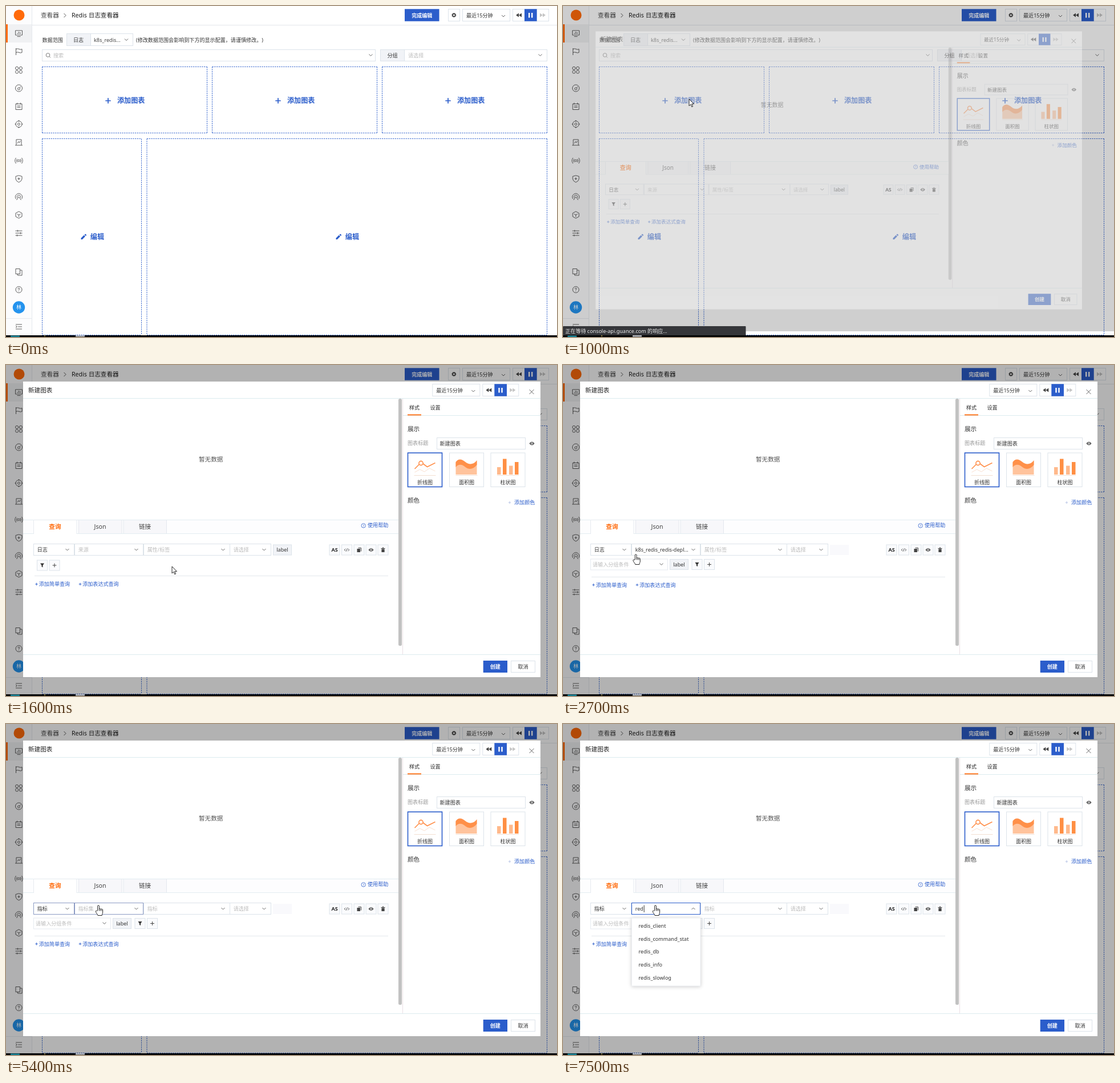
Write an HTML page that moves like this. It is 966x580 px and loops after 8000 ms.

```html
<!DOCTYPE html>
<html lang="zh-CN">
<head>
<meta charset="utf-8">
<title>Redis 日志查看器</title>
<style>
html, body { margin: 0; width: 100%; height: 100%; overflow: hidden; background: #fff; }
svg { display: block; width: 100vw; height: 100vh; }
text { font-family: "Noto Sans", "Noto Sans CJK SC", sans-serif; white-space: pre; text-spacing-trim: space-all; }
</style>
</head>
<body>
<svg viewBox="0 0 966 580">
  <g id="page"></g>
  <rect id="mask" width="966" height="577"/>
  <g id="modal"><g id="panel"></g><g id="query"></g></g>
  <g id="status"></g>
  <g id="bar"></g>
  <path id="cursor" fill="#fff" stroke="#111" stroke-width=".9" stroke-linejoin="round"/>
</svg>
<script>
const BLUE = '#2b5dcb', ORANGE = '#ff6a0a', INK = '#333', DIM = '#bcbcbc', EDGE = '#dce3ea', PALE = '#f1f3f7';
const S = 9.07, M = 10.6, L = 12.1;
const $ = id => document.getElementById(id);

// Drawing helpers: text is placed by its left edge and vertical centre.
const text = (x, y, s, fill = INK, size = S, more = '') =>
  `<text x="${x}" y="${(y + size * .37).toFixed(2)}" font-size="${size}" fill="${fill}" ${more}>${s}</text>`;
const mid = (x, y, s, fill, size, more = '') => text(x, y, s, fill, size, 'text-anchor="middle" ' + more);
const rect = (x, y, x2, y2, fill = '#fff', stroke = 'none', more = '') =>
  `<rect x="${x}" y="${y}" width="${x2 - x}" height="${y2 - y}" fill="${fill}" stroke="${stroke}" ${more}/>`;
const path = (d, stroke = '#555', w = 1, more = '') =>
  `<path d="${d}" stroke="${stroke}" stroke-width="${w}" fill="none" ${more}/>`;
const solid = (d, fill) => `<path d="${d}" fill="${fill}"/>`;
const disc = (x, y, r, fill = 'none', stroke = 'none', w = 1) =>
  `<circle cx="${x}" cy="${y}" r="${r}" fill="${fill}" stroke="${stroke}" stroke-width="${w}"/>`;
const at = (x, y, s) => `<g transform="translate(${x} ${y})">${s}</g>`;
const chevron = (x, y, up) => path(`M${x - 3} ${y + (up ? 1.5 : -1.5)}l3 ${up ? -3 : 3}l3 ${up ? 3 : -3}`, '#666');
const plus = (x, y, r, c, w) => path(`M${x - r} ${y}h${2 * r}M${x} ${y - r}v${2 * r}`, c, w);
const BOLD = 'font-weight="700"', MEDIUM = 'font-weight="500"';

const eye = (x, y) => at(x, y, solid('M-4.5 0Q0-6 4.5 0Q0 6-4.5 0', '#444') + disc(0, 0, 1.9, '#fff') + disc(0, 0, 1, '#444'));

// Time range select with the rewind / pause / forward group.
const player = () =>
  rect(800.5, 5.5, 883.5, 26.5, '#fff', EDGE) + text(807, 16.5, '最近15分钟') + chevron(872, 17.5) +
  rect(888.5, 5.5, 951.5, 26.5, '#fff', EDGE) + rect(909, 5.3, 930.7, 26.7, BLUE) +
  solid('M899 12.5v7l-5-3.5zM904 12.5v7l-5-3.5z', '#444') +
  rect(916, 12, 918.4, 20.5) + rect(921, 12, 923.4, 20.5) +
  solid('M936 12.5v7l5-3.5zM941 12.5v7l5-3.5z', '#c4c4c4');

const pencil = (x, y) => at(x, y, solid('M-4.5 4.5v-2.3l5.2-5.2l2.3 2.3l-5.2 5.2zM1.5-3.8l1-1q.6-.5 1.2 0l1.1 1.1q.5.6 0 1.2l-1 1z', BLUE));

// Every side starts its own dash pattern, as a CSS border does.
const dashed = (x, y, x2, y2) =>
  path(`M${x} ${y}H${x2}M${x} ${y2}H${x2}M${x} ${y}V${y2}M${x2} ${y}V${y2}`, BLUE, .95, 'stroke-dasharray="2.27 1.51"');

const sideIcons = [
  [48, 'M-6-5h12v8h-12zM-3 5.5h6M-2.5 1v-2M0 1v-4M2.5 1v-3'],
  [80, 'M-5-6v12M-5-4.5q3-1.5 5.5 0t5 0v6q-2.5 1.2-5 0t-5.5 0'],
  [112, 'M-6-3a2.6 2.6 0 1 1 5.2 0a2.6 2.6 0 1 1-5.2 0M.8-3a2.6 2.6 0 1 1 5.2 0a2.6 2.6 0 1 1-5.2 0M-6 3.5a2.6 2.6 0 1 1 5.2 0a2.6 2.6 0 1 1-5.2 0M.8 3.5a2.6 2.6 0 1 1 5.2 0a2.6 2.6 0 1 1-5.2 0'],
  [144, 'M-6 0a6 6 0 1 1 12 0a6 6 0 1 1-12 0M-2 1a2 2 0 1 1 4 0a2 2 0 1 1-4 0M1.2-.5L3.5-3'],
  [176, 'M-5.5-4.5h11v10h-11zM-3-6.5v3M3-6.5v3M-3-1h6M-3 1.5h6'],
  [207, 'M-5.5 0a5.5 5.5 0 1 1 11 0a5.5 5.5 0 1 1-11 0M-2 0a2 2 0 1 1 4 0a2 2 0 1 1-4 0M0-7v2.5M0 7v-2.5M-7 0h2.5M7 0h-2.5'],
  [239, 'M-4.5 5v-10h9v10M-6.5 5h13M-2.5 1.5l2-3l1.5 2l1.8-3'],
  [271, 'M-1.8 0a1.8 1.8 0 1 1 3.6 0a1.8 1.8 0 1 1-3.6 0M-3-3q-2 3 0 6M3-3q2 3 0 6M-5-5q-3.5 5 0 10M5-5q3.5 5 0 10'],
  [303, 'M0-6l5.5 1.5v4.5q-.5 4-5.5 6q-5-2-5.5-6v-4.5zM-2.2-.3h4.4M0-2.5v4.4'],
  [334, 'M-5 4a6 6 0 1 1 10 0M-3 2a3.3 3.3 0 1 1 6 0M0 0l-4 6M0 0l4 6'],
  [366, 'M0-6l5.5 3v6l-5.5 3l-5.5-3v-6zM-3-1.5l3 1.5l3-1.5M0 0v3.5'],
  [398, 'M-6-4h12M-6 0h12M-6 4h12M-2-5.5v3M3-1.5v3M-3 2.5v3'],
  [466, 'M-5.5-5.5h7.5v9h-7.5zM2-3h3.5v9h-7.5v-2.5'],
  [497, 'M-5.5 0a5.5 5.5 0 1 1 11 0a5.5 5.5 0 1 1-11 0M-1.5-1q0-2 1.5-2t1.5 1.5q0 1-1.5 1.5v1M0 2.5v1'],
  [562, 'M-5.5-4h11M-1.5 0h7M-5.5 4h11M-5.5-1.8l2.5 1.8l-2.5 1.8']
];

const sidebar = () =>
  rect(0, 0, 45, 577, '#fcfcfd') + path('M45.5 0V577', '#e6e9ee') + rect(0, 32, 45, 64, '#f0f1f3') + rect(0, 32, 3, 64, ORANGE) +
  disc(23, 16, 9.5, ORANGE) + sideIcons.map(([y, d]) => at(22.5, y, path(d, '#555', .95))).join('') +
  disc(22.5, 528, 10.7, '#2493ee') + mid(22.5, 528, '林', '#fff', S) + path('M0 547.5H45', '#e6e9ee');

const page = () =>
  rect(0, 0, 966, 580) + sidebar() + path('M45 33.5H966', '#e3e6ea') +
  text(61, 16.5, '查看器', '#444', M) + path('M101.5 13l3.5 3.5l-3.5 3.5', '#555') + text(115, 16.5, 'Redis 日志查看器', '#1c1c1c', M) +
  rect(699, 5.3, 759.5, 26.7, BLUE) + mid(729.3, 16.5, '完成编辑', '#fff', S, BOLD) +
  rect(775.5, 5.5, 795.5, 26.5, '#fff', EDGE) + disc(785.3, 16, 2.4, 'none', '#444', 1.7) +
  `<circle cx="785.3" cy="16" r="3.5" fill="none" stroke="#444" stroke-dasharray="1.5 1.25"/>` + player() +
  text(63.5, 59.5, '数据范围') + rect(106.5, 48.5, 222.5, 69.5, '#fff', EDGE) + rect(107, 49, 148, 69, PALE) + path('M148.5 49V69', EDGE) +
  text(118, 59.5, '日志') + text(154, 59.5, 'k8s_redis...', '#444') + chevron(211, 59) +
  text(228, 59.5, '(修改数据范围会影响到下方的显示配置，请谨慎修改。)') +
  rect(63.5, 76.5, 647.5, 96.5, '#fff', EDGE) + disc(73.5, 86, 3.3, 'none', '#777') + path('M76 88.5l2 2', '#777') +
  text(83, 86.5, '搜索', DIM) + chevron(639.5, 86) +
  rect(656.5, 76.5, 948.5, 96.5, '#fff', EDGE) + rect(657, 77, 698, 96, PALE) + path('M698.5 77V96', EDGE) +
  text(668.5, 86.5, '分组') + text(705, 86.5, '请选择', DIM) + chevron(936.5, 86) +
  [64, 362, 660].map(x => dashed(x - .5, 106.5, x + 288.5, 222.5) + plus(x + 115, 166, 4.7, BLUE, 1.7) +
    text(x + 131, 165.2, '添加图表', BLUE, L, BOLD)).join('') +
  [[63.5, 237.5, 136], [247, 948.5, 583]].map(([a, b, x]) => dashed(a, 232.5, b, 576.5) + pencil(x, 404.5) +
    text(x + 11.8, 405, '编辑', BLUE, L, BOLD)).join('');

const card = (x, name, art, on) =>
  rect(x, 154, x + 60, 213.5, '#fff', on ? BLUE : EDGE, on ? 'stroke-width="1.6"' : '') + at(x, 0, art) +
  path(`M${x + 11} 193.5h38`, '#f3dfd2') + mid(x + 30, 205.5, name);

const iconBox = (x, y, art) => rect(x - 9, y - 9, x + 9, y + 9, '#fafbfd', EDGE) + at(x, y, art);
const filterBox = (x, y) => iconBox(x, y, solid('M-3.5-3.5h7l-2.5 3.5v3.5l-2-1v-2.5z', '#333'));
const plusBox = (x, y) => iconBox(x, y, plus(0, 0, 3.4, '#444', 1));
const labelBox = (x, y) => rect(x + .5, y - 9, x + 32.5, y + 9, PALE, EDGE) + mid(x + 16.5, y, 'label');

const panel = () =>
  rect(30, 29, 937, 547) + text(39, 44, '新建图表', '#222', M, MEDIUM) + path('M30 58.5H937M30 507.5H937', '#dcebef') +
  at(-52.7, 28, player()) + path('M917.5 43l8 8M925.5 43l-8 8', '#666') +
  path('M695.5 59V507', '#eadfe4') + rect(688, 59, 694, 492, '#c2c2c2', 'none', 'rx="2.5"') +
  text(707, 74.5, '样式', '#222', S, MEDIUM) + text(743.5, 74.5, '设置') + path('M696 88.5H937', '#dcebef') + rect(704, 86.5, 728, 88.3, ORANGE) +
  text(704, 112, '展示', INK, M) + text(704, 137, '图表标题', '#999') + rect(755.5, 127.5, 910.5, 147.5, '#fff', EDGE) + text(760.5, 137.5, '新建图表') + eye(922, 137.5) +
  card(704.5, '折线图', path('M12 182l8-8M26 172.5l8 6l14-7', '#ff8f4a', 1.6) + disc(23, 172, 3.6, '#fff', '#ff8f4a', 1.6) +
    path('M12 188l9-5l8 4l9-6l10 5', '#fae0d0'), true) +
  card(777.5, '面积图', solid('M11 171c5-7 11-5 17 0s14 5 20-3v24h-37z', '#ffc39c') + solid('M11 170c5-7 11-5 17 0s14 5 20-3v8c-6 8-14 9-20 4s-12-6-17 0z', '#ff9049')) +
  card(850, '柱状图', [[11, 179], [21, 164.5], [32, 176.5], [42, 170]].map(([x, y], i) => rect(x, y, x + 6.5, 192, i % 2 ? '#ff8f43' : '#ffb98c')).join('')) +
  text(704, 237.5, '颜色', INK, M) + plus(883, 241, 2.2, '#b9c6e6', 1) + text(891, 241, '添加颜色', BLUE) +
  text(338, 165.5, '暂无数据', '#555', M) +
  rect(30, 271, 688, 295, '#fdfdfe') + path('M30 271.5H688M30 295.5H688', '#e3edf1') +
  rect(127, 272, 203, 295, '#f7f7fa') + rect(206, 272, 281, 295, '#f7f7fa') + path('M127.5 271V295M203 271V295M206 271V295M281.5 271V295', '#e4e7ee') +
  rect(48, 271, 124, 296.5) + path('M48.5 296V271.5H124V296', '#e6ebf0') + text(75.3, 283.5, '查询', ORANGE, M, BOLD) +
  mid(165, 283.5, 'Json', '#444', M) + text(233, 283.5, '链接', '#444', M) +
  disc(626.7, 281.5, 3.7, 'none', BLUE, .8) + mid(626.7, 281.5, '?', BLUE, 6) + text(634, 281, '使用帮助', BLUE) +
  iconBox(576, 324, mid(0, 0, 'AS', '#222', S, BOLD)) +
  iconBox(597.5, 324, path('M-2-2l-2.3 2l2.3 2M2-2l2.3 2l-2.3 2M.8-2.5l-1.6 5', '#444', .9)) +
  iconBox(619, 324, path('M-1.5-3.5h5v6', '#444', 1) + rect(-3.5, -2, 2, 4, '#444')) +
  iconBox(640, 324, eye(0, 0)) +
  iconBox(661, 324, rect(-2.6, -1.5, 2.6, 4, '#444') + path('M-3.5-2.5h7M-1-3.8h2', '#444', 1.2)) +
  rect(836.7, 518, 879, 539, BLUE) + mid(857.8, 528.5, '创建', '#fff', S, BOLD) +
  rect(885.5, 518.5, 927.5, 538.5, '#fff', EDGE) + mid(906.5, 528.5, '取消');

const select = (x, x2, s, fill, edge = EDGE, up = false) =>
  rect(x + .5, 313.5, x2 + .5, 333.5, '#fff', edge) + text(x + 6.7, 324, s, fill) + chevron(x2 - 11.5, 323.5, up);

const list = (x, y, x2, y2, items, tx, first, hover, scroll) =>
  rect(x, y, x2, y2, '#fff', '#eceef1', 'rx="1" style="filter:drop-shadow(0 1px 3px #0003)"') +
  (hover ? rect(x + 1, first - 11, x2 - 1, first + 11, '#f3f5f9') : '') +
  `<svg x="0" y="0" width="966" height="${y2}" style="width:966px;height:${y2}px">` +
  items.map((s, i) => text(tx, first + i * 22.7, s)).join('') + '</svg>' +
  (scroll ? rect(x2 - 6.5, y, x2 - .5, scroll, '#c4c4c4', 'none', 'rx="3"') : '');

const kinds = ['指标', '日志', '系统对象', '自定义对象', '事件', '应用性能', '用户访问'];
const redis = ['client', 'command_stat', 'db', 'info', 'slowlog'].map(s => 'redis_' + s);
const sets = ['cpu', 'disk', 'diskio', 'docker_containers', 'elastic_cluster_health', 'elastic_cluster_stats', 'host_processes'];
const setsR = ['docker_containers', 'elastic_cluster_health', 'host_processes', 'kube_replicaset', ...redis.slice(0, 3)];

function query(t) {
  const filled = t >= 2500, metric = t >= 4900, open1 = t >= 3900 && !metric, open2 = t >= 5600;
  const typed = t >= 7500 ? 'red' : t >= 7300 ? 're' : t >= 7100 ? 'r' : '';
  const caret = open2 && (typed || (t - 5600) % 1000 < 500);
  const soft = '#8c9bc4';
  let s = select(241, 392, metric ? '指标' : '属性/标签', DIM) + select(392, 464, '请选择', DIM);
  s += select(120, 240, typed || (metric ? '指标集' : filled ? 'k8s_redis_redis-depl...' : '来源'),
    typed || (filled && !metric) ? INK : DIM, open2 ? BLUE : t >= 5200 ? soft : EDGE, open2);
  s += select(48, 119, metric ? '指标' : '日志', open1 ? DIM : INK, open1 || (metric && t < 5700) ? soft : EDGE, open1);
  if (filled) {
    s += rect(468, 315, 501, 333, '#f9f9fc') + rect(48.5, 340, 183.5, 359, '#fff', '#e6eaf0') + text(52, 349.5, '请输入分组条件', DIM) + chevron(172.5, 349) +
      labelBox(187, 349.5) + filterBox(235, 349.5) + plusBox(256.5, 349.5);
  } else {
    s += labelBox(468, 324) + filterBox(63.5, 351) + plusBox(85, 351);
  }
  const y = filled ? 385.3 : 384;
  s += path(`M50 ${filled ? 371.5 : 369.5}H670`, '#e4e8ec') +
    [[50.5, '添加简单查询'], [127, '添加表达式查询']].map(([x, w]) => plus(x + 3, y, 2.3, BLUE, .9) + text(x + 7.2, y, w, BLUE)).join('');
  if (t >= 3900 && t < 5200) {
    const fade = metric ? Math.max(0, .6 - (t - 4900) / 300) : 1;
    s += `<g opacity="${fade}">` + list(48.5, 338, 124.5, 490, kinds, 60.5, 353.5, t >= 4300, 446) + '</g>';
  }
  if (open2) {
    const fade = Math.min(1, .5 + (t - 5600) / 400);
    const [x2, y2, items] = typed === 'red' ? [241, 459, redis] : typed === 're' ? [241, 482, ['kube_replicaset', ...redis]] :
      [270, 490, typed ? setsR : sets];
    s += `<g opacity="${fade}">` + list(120.5, 340, x2, y2, items, 132.5, 353.5, false, x2 > 250 && 386) + '</g>';
  }
  if (caret) {
    const x = 127 + 4.9 * typed.length;
    s += rect(x, 317.5, x + .9, 330, '#222');
  }
  return s;
}

const ARROW = 'M0 0V12L2.8 9.4L4.8 13.8L6.6 13L4.7 8.7H8.5Z';
const HAND = 'M-1.4 9V1.2a1.4 1.4 0 0 1 2.8 0V6.5c0-1.4 2.3-1.2 2.3.2c0-1.2 2.1-1 2.1.3c0-1 1.8-.8 1.8.6V12c0 2-1.2 2.8-1.4 5.5H-1c-.4-2.4-2.6-3.6-3.8-6.8c-.5-1.5 1.2-2 2-1.1zM1.4 6.5v3M3.7 7v2.5M5.8 7.5v2';
const track = [[100, 616, 98], [200, 540, 128], [300, 400, 155], [400, 285, 170], [500, 217, 175], [600, 221, 163], [1100, 221, 163],
  [1300, 420, 325], [1400, 440, 333], [1600, 291, 353], [2100, 291, 353], [2600, 140, 338], [2900, 103, 320], [3900, 103, 320], [4600, 80, 350],
  [4800, 80, 350], [5200, 145, 330], [5400, 162, 318], [8000, 162, 318]];

function pointer(t) {
  const i = Math.max(1, track.findIndex(p => p[0] >= t)), [a, b] = [track[i - 1], track[i]];
  const k = Math.max(0, (t - a[0]) / (b[0] - a[0]));
  return [a[1] + (b[1] - a[1]) * k, a[2] + (b[2] - a[2]) * k];
}

function draw(t) {
  const x = Math.min(1, Math.max(0, (t - 954) / 203));
  const p = t < 1000 ? 0 : 1 - (1 - x) ** 2, k = .9 + .1 * p;
  $('mask').setAttribute('opacity', .3 * Math.sqrt(p));
  $('mask').setAttribute('height', t < 1100 ? 570 : t < 1200 ? 573 : 577);
  $('modal').setAttribute('opacity', p);
  $('modal').setAttribute('transform', `translate(483.5 288) scale(${k}) translate(-483.5 -288)`);
  $('query').innerHTML = query(t);
  $('status').setAttribute('visibility', t >= 1000 && t < 1300 ? 'visible' : 'hidden');

  const [cx, cy] = pointer(t);
  const onCard = t < 1000 && cy > 106 && (cx < 352 || cx > 362);
  const hand = onCard || (t >= 2900 && t < 4900) || t >= 5200 || (t >= 2200 && cy < 334);
  $('cursor').setAttribute('d', hand ? HAND : ARROW);
  $('cursor').setAttribute('transform', `translate(${cx} ${cy})`);
  $('cursor').setAttribute('visibility', t < 100 ? 'hidden' : 'visible');
}

$('page').innerHTML = page();
$('panel').innerHTML = panel();
$('status').innerHTML = rect(0, 561, 320.5, 577, '#35363a', 'none', 'rx="1"') + text(4, 569.5, '正在等待 console-api.guance.com 的响应...', '#eee');
$('bar').innerHTML = rect(0, 577, 966, 580, '#050505') + rect(8, 577.5, 24, 580, '#167f92') + rect(67, 577, 69, 579, '#8a7a3a') + rect(122, 577, 138, 579.5, '#b9bcc2');

let last = -1;
const start = performance.now();
function tick() {
  const t = Math.floor((performance.now() - start) % 8000 / 100) * 100;
  if (t !== last) draw(last = t);
  requestAnimationFrame(tick);
}
tick();
</script>
</body>
</html>
```
